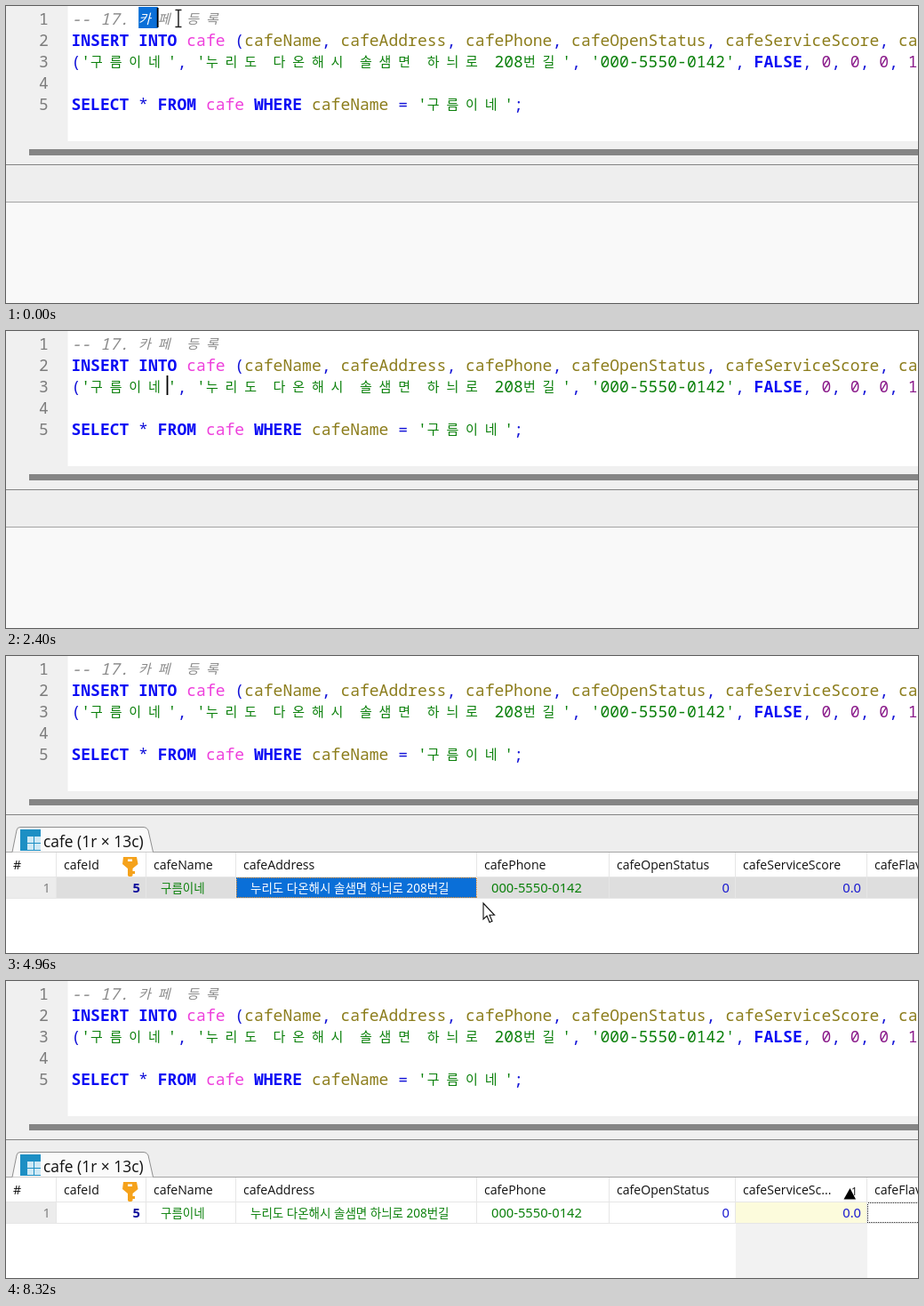
These frames come from a looping animation (1026 px wide and 334 px high, 8400 ms). An HTML page:

```html
<!DOCTYPE html>
<html lang="ko">
<head>
<meta charset="utf-8">
<style>
html, body { margin: 0; width: 100%; height: 100%; overflow: hidden; background: #fff; }
svg { display: block; }
text { white-space: pre; }
.code { font: 18px "Noto Sans Mono", "DejaVu Sans Mono", monospace; }
.code .ko { font: 15px "Noto Sans CJK KR", "Noto Sans CJK JP", sans-serif; }
.code .kw { font-weight: 700; fill: #0c0cf4; }
.code .note { font-style: italic; fill: #8a8a8a; }
.tbl { fill: #ee40dc; }
.col { fill: #8c7d1c; }
.str { fill: #0b800b; }
.num { fill: #8a1a8a; }
.sym { fill: #1414d8; }
.line { fill: #7c7c7c; }
.white .code text { fill: #fff; }
.ui { font: 14.1px "Open Sans", "Noto Sans", sans-serif; fill: #111; }
.tab { font-size: 17.4px; }
.small { font-size: 12px; }
.data { font: 14.7px "Noto Sans", "Open Sans", sans-serif; }
.data .ko { font: 13.5px "Noto Sans", "Noto Sans CJK KR", "Noto Sans CJK JP", sans-serif; }
.data .bold { font-weight: 700; }
#focus { fill: none; stroke-dasharray: 1 1; shape-rendering: crispEdges; }
</style>
</head>
<body>
<svg id="stage" xmlns="http://www.w3.org/2000/svg" width="1026" height="334" viewBox="0 0 1026 334"></svg>
<script>
const LOOP = 8400, TICK = 80, BLINK = 530;
const WIDTH = 1026, LEFT = 73.4, CELL = 10.82, LINE = 24;
const HEAD_Y = 221, ROW_Y = 249, ROW_H = 23;
const BLUE = '#0a6fd8', RULE = '#e6e6e6';
const TITLE = '카페 등록', SHOP = '구름이네', PHONE = '000-5550-0142';
const ADDRESS = '누리도 다온해시 솔샘면 하늬로 208번길';

const cellX = n => LEFT + n * CELL;
const cells = c => c >= '가' && c <= '힣' ? 2 : 1;
const rect = (x, y, w, h, fill, id = '') =>
  `<rect x="${x}" y="${y}" width="${w}" height="${h}" fill="${fill}" id="${id}"/>`;
const label = (x, y, s, cls = '', more = '') =>
  `<text x="${x}" y="${y}" class="${cls}" ${more}>${s}</text>`;

// Cell positions of every character edge; a Hangul syllable is two cells wide.
function edges(str, from) {
  const out = [from];
  for (const c of str) out.push(from += cells(c));
  return out;
}

function codeLine(row, tokens) {
  const y = 20.5 + LINE * row;
  let cell = 0, out = '';
  for (const [cls, str] of tokens) {
    for (const part of str.match(/[가-힣]+|[^가-힣]+/g)) {
      const at = edges(part, cell), ko = cells(part[0]) === 2;
      cell = at.pop();
      out += label(at.map(n => cellX(n).toFixed(1)).join(' '), ko ? y - 1 : y, part, ko ? cls + ' ko' : cls);
    }
  }
  return out;
}

const listOf = (cls, items) => items.flatMap(s => [[cls, s], ['sym', ', ']]);
const code = `<g class="code">${[
  [['note', '-- 17. ' + TITLE]],
  [['kw', 'INSERT INTO '], ['tbl', 'cafe '], ['sym', '('],
    ...listOf('col', ['cafeName', 'cafeAddress', 'cafePhone', 'cafeOpenStatus', 'cafeServiceScore']),
    ['col', 'ca']],
  [['sym', '('], ...listOf('str', [SHOP, ADDRESS, PHONE].map(s => `'${s}'`)),
    ['kw', 'FALSE'], ['sym', ', '], ...listOf('num', ['0', '0', '0']), ['num', '1']],
  [],
  [['kw', 'SELECT '], ['sym', '* '], ['kw', 'FROM '], ['tbl', 'cafe '], ['kw', 'WHERE '],
    ['col', 'cafeName '], ['sym', '= '], ['str', `'${SHOP}'`], ['sym', ';']]
].map((tokens, row) => codeLine(row, tokens)).join('')}</g>`;
const gutter = `<g class="code">${[...'12345'].map((n, i) => label(37, 20.5 + LINE * i, n, 'line')).join('')}</g>`;

const GREEN = '#0b800b', NUMBER = '#1a1ad0';
const cols = [
  { w: 57, head: '#', val: '1', color: '#808080', end: true },
  { w: 101, head: 'cafeId', val: '5', color: '#10109c', cls: 'bold', end: true },
  { w: 101, head: 'cafeName', val: SHOP, color: GREEN, cls: 'ko' },
  { w: 271, head: 'cafeAddress', val: ADDRESS, color: GREEN, cls: 'ko' },
  { w: 149, head: 'cafePhone', val: PHONE, color: GREEN },
  { w: 142, head: 'cafeOpenStatus', val: '0', color: NUMBER, end: true },
  { w: 148, head: 'cafeServiceScore', val: '0.0', color: NUMBER, end: true },
  { w: 149, head: 'cafeFlavor', val: '', color: NUMBER, end: true }
];
cols.reduce((x, c) => (c.x = x) + c.w, 0);
const colAt = x => cols.findIndex(c => x < c.x + c.w);
const score = cols[6];

const tab = `<path d="M7 220.5L12 196Q12.500 192.500 16 192.500H155Q158.500 192.500 160 196L165.500 220.500" fill="#fafafa" stroke="#8e8e8e"/>
  ${rect(16, 195, 23, 24, '#1d8fc4')}
  ${[0, 1, 2, 3].map(i => rect(24 + 8 * (i % 2), 203 + 8 * (i >> 1), 7, 7, '#cfe9f5')).join('')}
  ${label(42, 215, 'cafe (1r × 13c)', 'tab')}`;
const key = `<path fill="#f5a21b" fill-rule="evenodd" d="M132 226H147L148.500 234 142.500 239V242H145V245H142.500V247L139.500 249 137 247V239L131 234ZM137 228.500V231H142V228.500Z"/>`;
const header = c => label(c.x + 8, 240, c.head) + rect(c.x + c.w - 1, HEAD_Y, 1, 27, RULE);
const cell = (c, i) => rect(c.x, ROW_Y, c.w, ROW_H, '#fff', 'cell' + i) +
  rect(c.x + c.w - 1, ROW_Y, 1, ROW_H, RULE) +
  label(c.end ? c.x + c.w - 7 : c.x + 16, 266, c.val, c.cls,
    `id="val${i}" text-anchor="${c.end ? 'end' : 'start'}"`);

const grid = `<g id="grid" class="ui">${rect(0, HEAD_Y, WIDTH, 113, '#fff')}${tab}
  ${rect(score.x, ROW_Y + ROW_H, score.w, 62, '#f2f2f2', 'band')}
  ${rect(score.x, HEAD_Y, score.w, 27, '#d9ebf9', 'hot')}
  <g id="heads">${cols.map(header).join('')}</g>${key}
  <g id="sort"><path d="M942.500 245.500L949.500 233 956 245.500Z" fill="#000"/>${label(951, 241, '1', 'small')}</g>
  ${rect(0, ROW_Y - 1, WIDTH, 1, RULE)}${rect(0, ROW_Y + ROW_H, WIDTH, 1, RULE)}
  <g class="data">${cols.map(cell).join('')}</g>
  <rect id="focus" y="${ROW_Y + .5}" height="${ROW_H - 1}"/></g>`;

document.getElementById('stage').innerHTML = `
  <clipPath id="clip"><rect id="clipBox" height="${LINE}"/></clipPath>
  ${rect(0, 0, WIDTH, 334, '#fff')}${rect(0, 0, 69.5, 152, '#f0f0f0')}
  ${gutter}${code}
  <rect id="selBox" height="${LINE}" fill="${BLUE}"/>
  <g class="white" clip-path="url(#clip)">${code}</g>
  ${rect(0, 0, 1.8, 22, '#000', 'caret')}
  ${rect(0, 152, WIDTH, 26, '#f0f0f0')}${rect(26, 161, 1000, 7, '#858585')}
  ${rect(0, 178, WIDTH, 42, '#eeeeee')}${rect(0, 178, WIDTH, 1, '#838383')}
  ${rect(0, HEAD_Y, WIDTH, 113, '#f9f9f9')}${rect(0, HEAD_Y - 1, WIDTH, 1, '#a4a4a4')}
  ${grid}
  <path id="beam" d="M-3.500 -9.500H3.500M0 -9.500V9.500M-3.500 9.500H3.500" fill="none" stroke-width="1.500"/>
  <path id="arrow" d="M0 0V18L4 14.300 7 21.500 10 20.200 7 13.300H12.500Z" fill="#fff" stroke="#111" stroke-width="1.100"/>`;

const el = id => document.getElementById(id);
const set = (id, attrs) => {
  for (const k in attrs) el(id).setAttribute(k, attrs[k]);
};
const show = (id, on) => { el(id).style.display = on ? '' : 'none'; };

// The two texts swept with the mouse.
const drags = [
  { start: -280, end: 320, row: 0, from: 7, text: TITLE },
  { start: 1040, end: 1480, row: 2, from: 2, text: SHOP }
];
const DESELECT = 2000, RESULTS = 3360, BLUR = 7760;
for (const d of drags) {
  d.edges = edges(d.text, d.from);
  d.to = d.edges.at(-1);
}
const sweep = drags.flatMap(d => ['from', 'to'].map((side, i) =>
  ({ t: i ? d.end : d.start, x: cellX(d[side]) + 1, y: 14 + LINE * d.row })));
sweep.push({ ...sweep.at(-1), t: DESELECT });

// Stops of the arrow; a click picks the cell below it, or sorts in the heading.
const stops = [
  { t: 3600, x: 330, y: 190 },
  { t: 4160, x: 330, y: 258, click: true },
  { t: 4960, x: 537, y: 278 },
  { t: 5520, x: 620, y: 262, click: true },
  { t: 5760, x: 755, y: 262, click: true },
  { t: 6000, x: 874, y: 247, click: true },
  { t: 6160, x: 874, y: 247 },
  { t: 6480, x: 908, y: 262, click: true },
  { t: 6800, x: 984, y: 259, click: true },
  { t: 7200, x: 984, y: 259 },
  { t: 7680, x: 1030, y: 200 }
];
const inHead = p => p.y < ROW_Y;

function along(path, t) {
  const i = path.findIndex(p => p.t > t);
  if (i <= 0) return null;
  const a = path[i - 1], b = path[i];
  const u = (t - a.t) / (b.t - a.t), e = u * u * (3 - 2 * u);
  return { x: a.x + (b.x - a.x) * e, y: a.y + (b.y - a.y) * e };
}

function movePointer(id, p) {
  show(id, p);
  if (p) set(id, { transform: `translate(${p.x} ${p.y})` });
}

function drawEditor(t) {
  const d = drags.findLast(d => d.start <= t);
  // The selection trails the pointer by one tick and snaps to whole characters.
  const reach = t - TICK < d.end ? along(sweep, t - TICK).x : cellX(d.to) + 1;
  const to = d.edges.findLast(n => cellX(n) <= reach) ?? d.from;
  const from = t < DESELECT ? d.from : to;
  const box = { x: cellX(from), y: 1 + LINE * d.row, width: (to - from) * CELL };
  set('selBox', box);
  set('clipBox', box);
  set('caret', { x: cellX(to) - 1, y: 2 + LINE * d.row });
  show('caret', t < DESELECT || t < stops[0].t && Math.floor((t - DESELECT) / BLINK) % 2 === 0);
  set('beam', { stroke: t > drags[1].end ? '#c8641e' : '#222' });
  movePointer('beam', along(sweep, t));
}

function drawGrid(t) {
  const arrow = along(stops, t);
  movePointer('arrow', arrow);
  show('grid', t >= RESULTS);
  const clicks = stops.filter(s => s.click && s.t <= t);
  const picked = clicks.findLast(s => !inHead(s));
  const current = picked ? colAt(picked.x) : 1;
  const focused = picked && t < BLUR;
  const sorted = clicks.some(inHead);
  const hot = sorted && arrow && inHead(arrow);
  show('sort', sorted);
  show('band', sorted);
  show('hot', hot);
  el('heads').querySelectorAll('text')[cols.indexOf(score)].textContent =
    sorted ? score.head.slice(0, 13) + '...' : score.head;
  cols.forEach((c, i) => {
    const on = focused && i === current;
    const plain = i === 0 ? '#ececec' : focused ? '#dedede' : '#fff';
    const fill = c === score && sorted && !hot ? '#fcfbdc' : plain;
    set('cell' + i, { fill: on ? BLUE : fill });
    set('val' + i, { fill: on ? '#fff' : c.color });
  });
  set('focus', {
    x: cols[current].x + .5, width: cols[current].w - 1,
    stroke: focused ? '#f09024' : '#222'
  });
}

function frame() {
  const t = Math.floor(performance.now() % LOOP / TICK) * TICK;
  drawEditor(t);
  drawGrid(t);
  requestAnimationFrame(frame);
}
frame();
</script>
</body>
</html>
```
